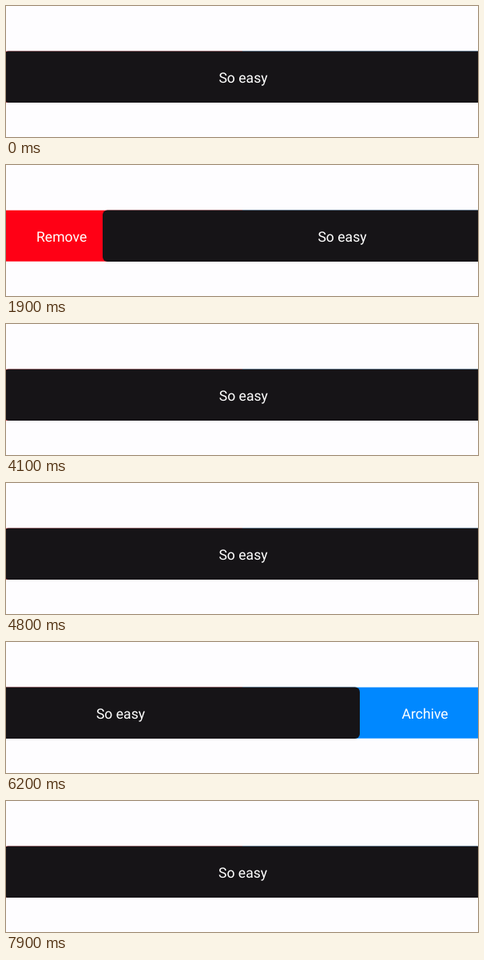
Animation of 591x164 px, one loop 8 s. Source, as an HTML page:

```html
<!DOCTYPE html>
<html lang="en">
<head>
<meta charset="utf-8">
<title>Swipe row</title>
<style>
  html, body { margin: 0; width: 100%; height: 100%; overflow: hidden; background: #fefdff; }
  svg { display: block; }
  text { font: 17.6px Roboto, sans-serif; fill: #fff; text-anchor: middle; text-rendering: geometricPrecision; }
</style>
</head>
<body>
<svg width="591" height="164" viewBox="0 0 591 164">
  <rect y="56.7" width="296" height="64" fill="#ff0015"/>
  <rect x="296" y="56.7" width="295" height="64" fill="#0088ff"/>
  <text x="69.6" y="96">Remove</text>
  <text x="524.6" y="96">Archive</text>
  <g id="card">
    <rect x="-3" y="56.6" width="599.5" height="64.4" rx="6" fill="#161417"/>
    <text x="297" y="96">So easy</text>
  </g>
</svg>
<script>
  const LOOP = 8000, REMOVE = 124, ARCHIVE = -119;
  const card = document.getElementById('card');

  // Each swipe eases the card to a new offset: start ms, end ms, px
  const swipes = [
    { from: 1150, to: 1600, x: 185 },
    { from: 1600, to: 1900, x: REMOVE },
    { from: 3510, to: 4200, x: -7 },
    { from: 4200, to: 4800, x: 0 },
    { from: 5000, to: 5450, x: 38 },
    { from: 5450, to: 6200, x: -153.5 },
    { from: 6200, to: 6720, x: ARCHIVE },
    { from: 6720, to: 7500, x: 4 },
    { from: 7500, to: 7850, x: -0.4 }
  ];

  const clamp = u => Math.min(1, Math.max(0, u));
  const ease = u => u * u * (3 - 2 * u);

  const offset = t => swipes.reduce(
    (x, s) => x + (s.x - x) * ease(clamp((t - s.from) / (s.to - s.from))), 0);

  function draw() {
    const x = offset(performance.now() % LOOP);
    card.setAttribute('transform', `translate(${x.toFixed(2)} 0)`);
    requestAnimationFrame(draw);
  }
  draw();
</script>
</body>
</html>
```
